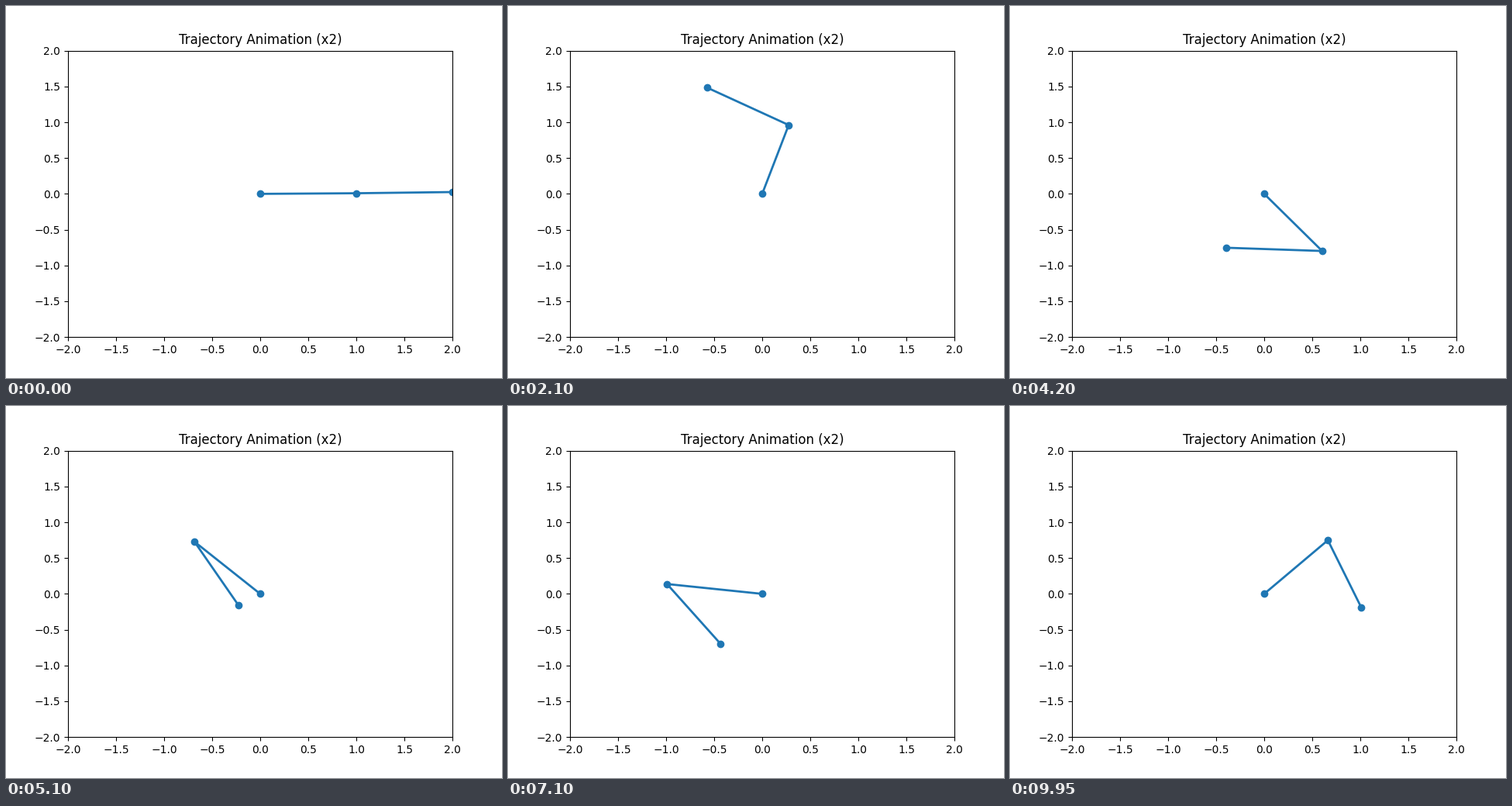
A matplotlib script that plays this animation: 640x480 px, repeating every 10 s.

```python
import numpy as np
import matplotlib.pyplot as plt
from matplotlib.animation import FuncAnimation

FRAMES = 200
INTERVAL = 50  # ms

# Main poses of the two-link arm: step, angle of each link (degrees)
POSES = np.array([
    (0, 0.5, 0.95),
    (14, 48, 90),
    (31, 96, 182),
    (42, 74, 148.4),
    (51, 0, 44),
    (60, -155, -38),
    (66, -196, -170),
    (72, -85, -75),
    (84, -52.9, 177.4),
    (91, -31, 350),
    (102, 133.2, 657.3),
    (118, 350, 1060),
    (128, 422, 1166),
    (142, 172.1, 1023.7),
    (154, 73, 827),
    (166, -127.7, 560.6),
    (179, -330, 415),
    (189, -495, 265),
    (199, -671.5, -69.7),
])


def smooth_path(t, keys, values):
    """Cubic Hermite curve through the keys without overshoot."""
    step = np.diff(keys)
    rate = np.diff(values) / step
    before, after = rate[:-1], rate[1:]
    same_way = before * after > 0
    total = np.where(same_way, before + after, 1)
    inner = np.where(same_way, 2 * before * after / total, 0)
    slope = np.concatenate([rate[:1], inner, rate[-1:]])

    i = np.clip(np.searchsorted(keys, t, side="right") - 1, 0, len(step) - 1)
    h = step[i]
    u = (t - keys[i]) / h
    return ((1 + 2 * u) * (1 - u) ** 2 * values[i]
            + u * (1 - u) ** 2 * h * slope[i]
            + u ** 2 * (3 - 2 * u) * values[i + 1]
            + u ** 2 * (u - 1) * h * slope[i + 1])


def link(angle):
    return np.array([np.cos(angle), np.sin(angle)])


steps = np.arange(FRAMES)
keys, *angles = POSES.T
upper, lower = (np.radians(smooth_path(steps, keys, a)) for a in angles)
elbow = link(upper)
tip = elbow + link(lower)

fig, ax = plt.subplots(figsize=(6.4, 4.8), dpi=100)
ax.set_xlim(-2, 2)
ax.set_ylim(-2, 2)
ax.set_title("Trajectory Animation (x2)")
arm, = ax.plot([], [], "o-", lw=2, color="tab:blue")


def update(n):
    arm.set_data([0, elbow[0, n], tip[0, n]], [0, elbow[1, n], tip[1, n]])
    return arm,


anim = FuncAnimation(fig, update, frames=FRAMES, interval=INTERVAL,
                     repeat=True, repeat_delay=0)
plt.show()
```
